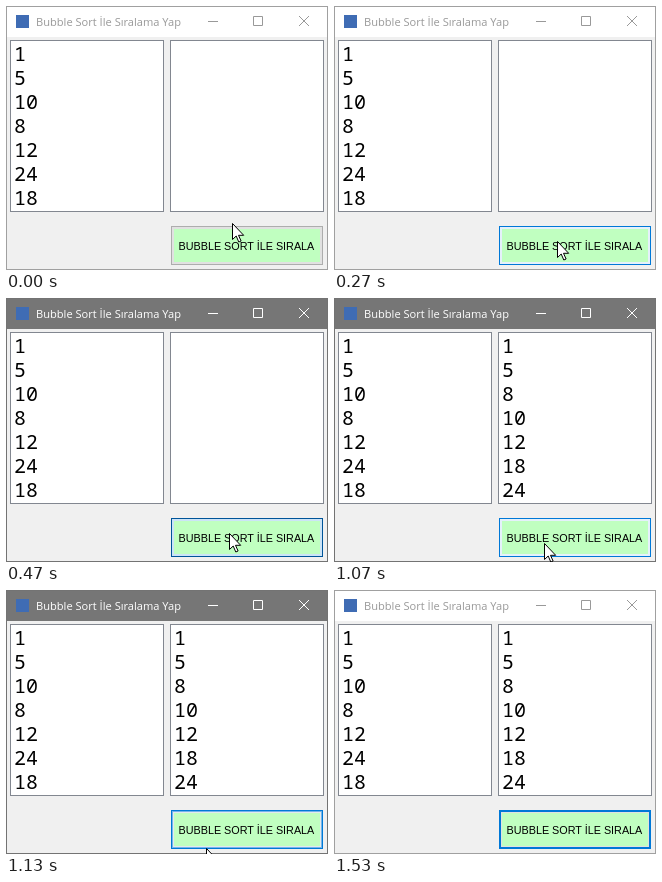
These frames come from a looping animation (322x264 px, 1740 ms). An HTML page:

```html
<!DOCTYPE html>
<html lang="tr">
<head>
<meta charset="utf-8">
<title>Bubble Sort</title>
<style>
  html, body { margin: 0; width: 100%; height: 100%; overflow: hidden; background: #f0f0f0; }
  svg { display: block; width: 322px; height: 264px; }
  text { white-space: pre; }
  .title { font: 11.1px "Open Sans", "Noto Sans", sans-serif; }
  .list { font: 500 20px "Noto Sans Mono", "DejaVu Sans Mono", monospace; }
  .label { font: 10.8px "Liberation Sans", Arial, sans-serif; }
</style>
</head>
<body>
<svg viewBox="0 0 322 264">
  <rect id="frame" width="322" height="264"/>
  <rect id="bar" x="1" y="1" width="320" height="30"/>
  <rect x="1" y="31" width="320" height="232" fill="#f0f0f0"/>
  <rect x="10" y="9" width="13" height="13" fill="#3f6cb4"/>
  <text id="title" class="title" x="30" y="20">Bubble Sort İle Sıralama Yap</text>
  <g id="controls" fill="none">
    <path d="M202 15.5h10M247.5 10.5h9v9h-9z"/>
    <path d="M293 10l10 10M303 10l-10 10"/>
  </g>
  <g fill="#fff" stroke="#828790">
    <rect x="4.5" y="34.5" width="153" height="171"/>
    <rect x="164.5" y="34.5" width="153" height="171"/>
  </g>
  <g id="input" class="list"></g>
  <g id="output" class="list"></g>
  <rect id="edge" x="165" y="220" width="152" height="39"/>
  <rect id="inner" x="166" y="221" width="150" height="37"/>
  <rect id="ring" x="167" y="222" width="148" height="35"/>
  <rect x="168" y="223" width="146" height="33" fill="#c0ffc0"/>
  <text class="label" x="172.5" y="244">BUBBLE SORT İLE SIRALA</text>
  <path id="cursor" d="M.5.5v16l3.7-3.5 2.6 6 2.3-1-2.6-5.7h5.2z" fill="#fff" stroke="#000"/>
</svg>
<script>
const LOOP = 1740;
const $ = id => document.getElementById(id);

// Button looks as RGB triples: outer line, second line, ring
const LOOKS = {
  normal:  [[173, 173, 173], [225, 225, 225], [225, 225, 225]],
  hover:   [[0, 120, 215], [229, 241, 251], [229, 241, 251]],
  pressed: [[0, 84, 153], [204, 228, 247], [204, 228, 247]],
  focus:   [[0, 120, 215], [0, 120, 215], [225, 225, 225]]
};

// start, cursor x, cursor y, look, next look, blend
const STEPS = [
  [0, 226, 217, 'normal', 'normal', 0],
  [70, 225, 225, 'normal', 'hover', 0.25],
  [130, 223, 232, 'normal', 'hover', 0.5],
  [200, 223, 235, 'normal', 'hover', 0.8],
  [270, 223, 235, 'hover', 'hover', 0],
  [470, 223, 235, 'pressed', 'pressed', 0],
  [530, 223, 235, 'hover', 'hover', 0],
  [1070, 210, 245, 'hover', 'hover', 0],
  [1130, 200, 258, 'hover', 'focus', 0.5],
  [1200, 190, 280, 'focus', 'focus', 0]
];

function bubbleSort(list) {
  const a = [...list];
  for (let end = a.length - 1; end > 0; end--)
    for (let i = 0; i < end; i++)
      if (a[i] > a[i + 1]) [a[i], a[i + 1]] = [a[i + 1], a[i]];
  return a;
}

function fillList(id, x, values) {
  values.forEach((value, i) => {
    const line = document.createElementNS('http://www.w3.org/2000/svg', 'text');
    line.setAttribute('x', x);
    line.setAttribute('y', 55 + 24 * i);
    line.textContent = value;
    $(id).append(line);
  });
}

function paintButton(from, to, blend) {
  ['edge', 'inner', 'ring'].forEach((id, part) => {
    const rgb = LOOKS[from][part].map((v, i) =>
      Math.round(v + (LOOKS[to][part][i] - v) * blend));
    $(id).setAttribute('fill', `rgb(${rgb})`);
  });
}

function paintWindow(active) {
  const ink = active ? '#fff' : '#999';
  $('frame').setAttribute('fill', active ? '#737373' : '#a0a0a0');
  $('bar').setAttribute('fill', active ? '#767676' : '#fff');
  $('title').setAttribute('fill', ink);
  $('controls').setAttribute('stroke', ink);
}

function render(t) {
  const [, x, y, from, to, blend] = STEPS.findLast(step => step[0] <= t);
  $('cursor').setAttribute('transform', `translate(${x} ${y})`);
  paintButton(from, to, blend);
  paintWindow(t >= 470 && t < 1530);
  $('output').setAttribute('visibility', t >= 530 ? 'visible' : 'hidden');
}

const numbers = [1, 5, 10, 8, 12, 24, 18];
fillList('input', 8, numbers);
fillList('output', 168, bubbleSort(numbers));

const start = performance.now();
function tick() {
  render((performance.now() - start) % LOOP);
  requestAnimationFrame(tick);
}
tick();
</script>
</body>
</html>
```
